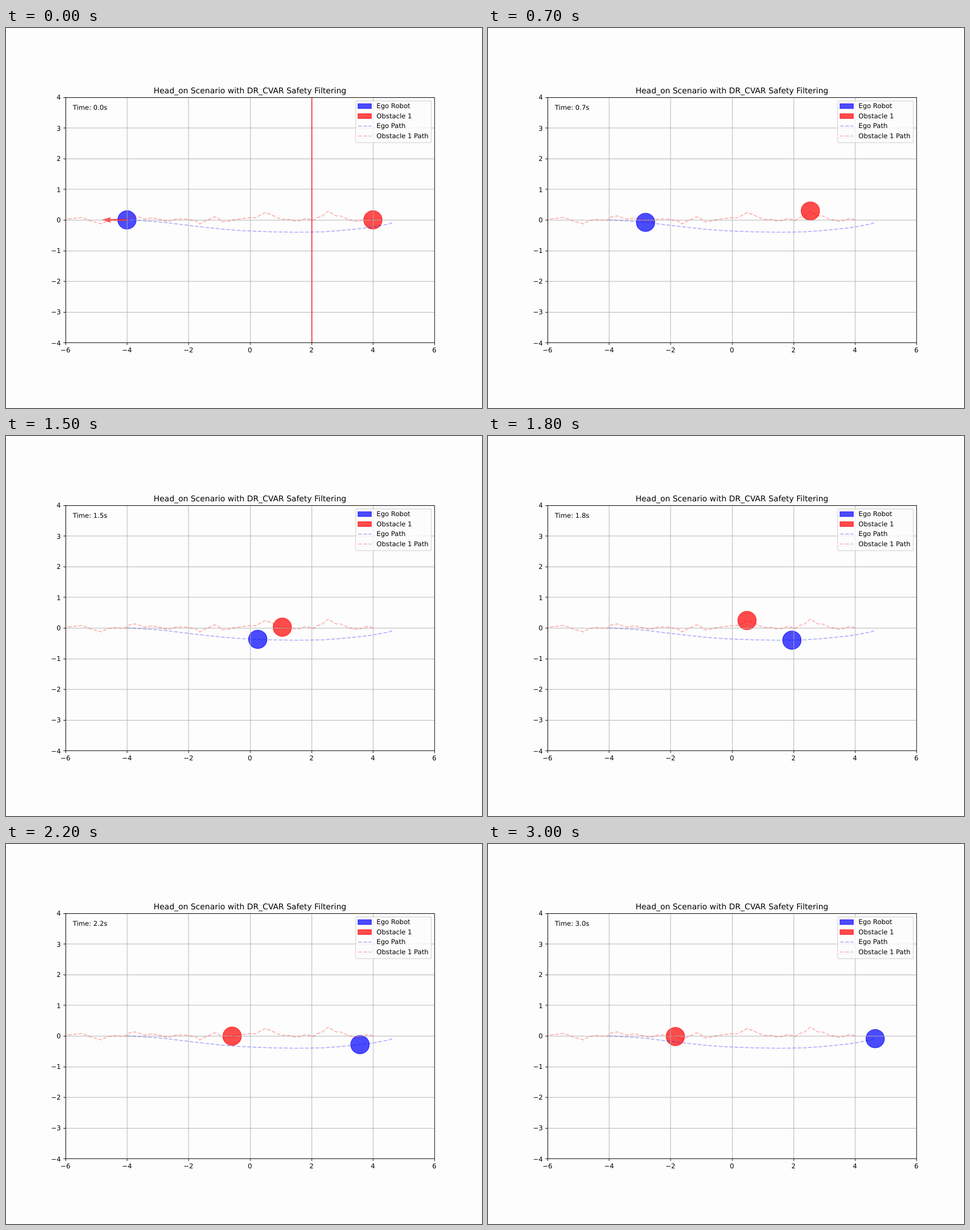
Animation of 837 by 669 pixels, one loop 3100 ms. Source, as an HTML page:

```html
<!DOCTYPE html>
<html lang="en">
<head>
<meta charset="utf-8">
<title>Head-on scenario</title>
<style>
  html, body { margin: 0; width: 100%; height: 100%; overflow: hidden; background: #fdfdfd; }
  svg { display: block; width: 837px; height: 669px; }
  text { font: 13.89px "DejaVu Sans", sans-serif; fill: #000; white-space: pre; text-rendering: geometricPrecision; }
  .title { font-size: 16.67px; }
  .mid { text-anchor: middle; }
  .end { text-anchor: end; }
  .grid { stroke: #b0b0b0; stroke-width: 1.11; fill: none; }
  .axis { stroke: #000; stroke-width: 1.11; fill: none; }
  .path { fill: none; stroke-width: 2.08; stroke-opacity: .3; stroke-dasharray: 7.71 3.33; stroke-linejoin: round; }
  .body { fill-opacity: .7; stroke-opacity: .7; stroke-width: 1.39; }
  .ego { stroke: #00f; }
  .obs { stroke: #f00; }
  .ego.body { fill: #00f; }
  .obs.body { fill: #f00; }
</style>
</head>
<body>
<svg id="stage" viewBox="0 0 1000 800" preserveAspectRatio="none"></svg>
<script>
const NS = "http://www.w3.org/2000/svg";
const stage = document.getElementById("stage");
const UNIT = 64.583, STEP = 100, STEPS = 31;
const px = x => 512.5 + UNIT * x;
const py = y => 404 - UNIT * y;
const snap = v => Math.round(v) + 0.5;
const signed = n => String(n).replace("-", "\u2212");

function add(tag, attrs, parent = stage, text = "") {
  const el = document.createElementNS(NS, tag);
  for (const key in attrs) el.setAttribute(key, attrs[key]);
  el.textContent = text;
  parent.appendChild(el);
  return el;
}
const label = (x, y, text, cls = "") => add("text", { x, y, class: cls }, stage, text);
const toPath = pts => "M" + pts.map(([x, y]) => `${px(x)} ${py(y)}`).join("L");

// Index of the key that opens the span holding step t
const spanAt = (keys, t) => Math.max(0, keys.findIndex(k => k[0] >= t) - 1);

// Smooth curve through one column of the keys
function curve(keys, t, col) {
  const i = spanAt(keys, t), last = keys.length - 1;
  const slope = k => {
    const a = keys[Math.max(k - 1, 0)], b = keys[Math.min(k + 1, last)];
    return (b[col] - a[col]) / (b[0] - a[0]);
  };
  const a = keys[i], b = keys[i + 1];
  const h = b[0] - a[0], s = (t - a[0]) / h, r = 1 - s;
  return a[col] * (1 + 2 * s) * r * r + slope(i) * h * s * r * r +
         b[col] * s * s * (3 - 2 * s) - slope(i + 1) * h * s * s * r;
}

// Steady drift between keys; sideways bumps fade quickly, plus a little jitter
const noise = n => {
  const v = Math.sin(n * 12.9898) * 43758.5453;
  return v - Math.floor(v) - 0.5;
};
function drift(keys, t) {
  const i = spanAt(keys, t), [t0, x0, y0] = keys[i], [t1, x1, y1] = keys[i + 1];
  const s = (t - t0) / (t1 - t0), jitter = s > 0 && s < 1 ? 0.12 : 0;
  return [
    x0 + (x1 - x0) * s + jitter * noise(t),
    y0 * (1 - s) ** 4 + y1 * s ** 4 + jitter * noise(t + 100)
  ];
}

// Keys: step, x, y
const egoKeys = [
  [0, -4, 0], [7, -2.81, -0.08], [11, -1.82, -0.2], [14, -0.31, -0.347],
  [18, 1.95, -0.4], [22, 3.58, -0.285], [26, 4.35, -0.165], [30, 4.66, -0.09]
];
const obsKeys = [
  [0, 4, 0], [7, 2.55, 0.29], [11, 1.82, 0.05], [18, 0.49, 0.24], [20, -0.04, 0.07],
  [22, -0.58, -0.01], [26, -1.15, 0.1], [28, -1.63, -0.13], [30, -1.84, -0.02],
  [37, -3.74, 0.13], [43, -4.83, -0.13], [45, -5.45, 0.08], [47, -6.1, 0]
];
const walk = (count, at) => Array.from({ length: count }, (_, i) => at(i));
const ego = walk(STEPS, i => [curve(egoKeys, i, 1), curve(egoKeys, i, 2)]);
const obs = walk(48, i => drift(obsKeys, i));

const [left, right, high, low] = [px(-6), px(6), py(4), py(-4)];
const clip = add("clipPath", { id: "plot" }, add("defs", {}));
add("rect", { x: left, y: high, width: right - left, height: low - high }, clip);
const plot = add("g", { "clip-path": "url(#plot)" });

const egoDot = add("circle", { r: 0.3 * UNIT, class: "ego body" }, plot);
const obsDot = add("circle", { r: 0.3 * UNIT, class: "obs body" }, plot);

// Safety constraint, only present at the first step
const arrow = add("path", {
  d: `M${px(-4)} ${py(0)}v-1.9h-36l2 -3.9l-19 5.8l19 5.8l-2 -3.9h36z`,
  fill: "#f00", "fill-opacity": 0.7
}, plot);

let gridD = "", tickD = "";
for (let x = -6; x <= 6; x += 2) {
  const gx = snap(px(x));
  gridD += `M${gx} ${high}V${low}`;
  tickD += `M${gx} ${snap(low)}v4.9`;
  label(px(x), 683, signed(x), "mid");
}
for (let y = -4; y <= 4; y++) {
  const gy = snap(py(y));
  gridD += `M${left} ${gy}H${right}`;
  tickD += `M${snap(left)} ${gy}h-4.9`;
  label(115.3, Math.round(py(y) + 5.3), signed(y), "end");
}
add("path", { d: gridD, class: "grid" }, plot);
add("path", { d: toPath(ego), class: "ego path" }, plot);
add("path", { d: toPath(obs), class: "obs path" }, plot);
const wall = add("path", {
  d: `M${snap(px(2))} ${high}V${low}`, class: "obs", "stroke-width": 2.08, "stroke-opacity": 0.7
}, plot);

add("path", { d: tickD, class: "axis" });
add("rect", {
  x: snap(left), y: snap(high), width: snap(right) - snap(left), height: snap(low) - snap(high), class: "axis"
});
label(px(0), 137, "Head_on Scenario with DR_CVAR Safety Filtering", "title mid");
const clock = label(140.5, 172, "");

add("rect", {
  x: 734.5, y: 153.5, width: 159, height: 88, rx: 2.8,
  fill: "#fdfdfd", "fill-opacity": 0.8, stroke: "#ccc", "stroke-opacity": 0.8, "stroke-width": 1.39
});
["Ego Robot", "Obstacle 1", "Ego Path", "Obstacle 1 Path"].forEach((name, i) => {
  const y = 164.4 + i * 20.9, who = i % 2 ? "obs" : "ego";
  if (i < 2) add("rect", { x: 739.5, y: snap(y - 5), width: 28, height: 10, class: who + " body" });
  else add("path", { d: `M739.7 ${snap(y)}h27.8`, class: who + " path" });
  label(778.5, Math.round(y + 4.8), name);
});

function place(dot, [x, y]) {
  dot.setAttribute("cx", px(x));
  dot.setAttribute("cy", py(y));
}
let shown = -1;
function show(i) {
  if (i === shown) return;
  shown = i;
  place(egoDot, ego[i]);
  place(obsDot, obs[i]);
  clock.textContent = `Time: ${(i / 10).toFixed(1)}s`;
  arrow.style.display = wall.style.display = i ? "none" : "";
}

const start = performance.now();
function tick() {
  show(Math.floor((performance.now() - start) / STEP) % STEPS);
  requestAnimationFrame(tick);
}
tick();
</script>
</body>
</html>
```
